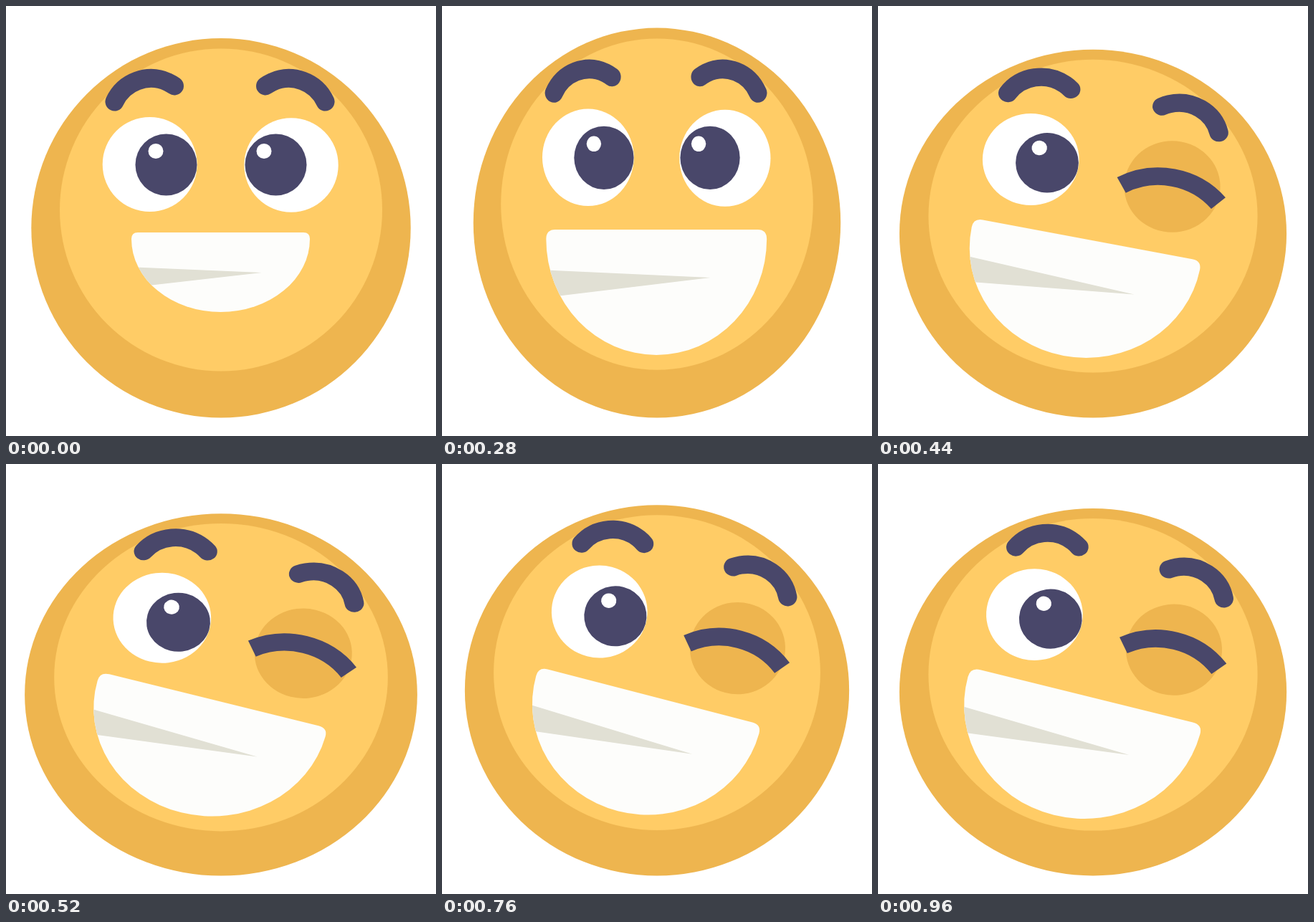
Animation of 600x600 px, one loop 1 s. Source, as an HTML page with a canvas:

```html
<!DOCTYPE html>
<html lang="en">
<head>
<meta charset="utf-8">
<title>Winking face</title>
<style>
  html, body { margin: 0; width: 100%; height: 100%; overflow: hidden; background: #fff; }
  canvas { display: block; width: 100vw; height: 100vh; }
</style>
</head>
<body>
<canvas id="stage" width="600" height="600"></canvas>
<script>
const ctx = document.getElementById('stage').getContext('2d');

const LOOP = 1000, STEP = 40, WINK_AT = 360;
const SHADE = '#eeb54f', SKIN = '#ffcc66', INK = '#49476a';
const TEETH = '#fdfdfb', GAP = '#e1e0d4', WHITE = '#fff';
const GROUND = 574.5, PIVOT = 285;

// Cubic Bezier easing, solved by bisection.
function bezier(x1, y1, x2, y2) {
  const at = (a, b, s) => 3 * (1 - s) ** 2 * s * a + 3 * (1 - s) * s * s * b + s ** 3;
  return p => {
    let lo = 0, hi = 1;
    for (let i = 0; i < 24; i++) {
      const mid = (lo + hi) / 2;
      if (at(x1, x2, mid) < p) lo = mid; else hi = mid;
    }
    return at(y1, y2, lo);
  };
}
const easeIn = bezier(.42, 0, 1, 1);
const easeOut = bezier(0, 0, .58, 1);
const easeInOut = bezier(.42, 0, .58, 1);

const lerp = (a, b, p) => a + (b - a) * p;

// Keys are [time, value, easing towards this key].
function track(t, keys) {
  for (let i = 1; i < keys.length; i++) {
    const [t0, v0] = keys[i - 1], [t1, v1, ease] = keys[i];
    if (t < t1) return t <= t0 ? v0 : lerp(v0, v1, ease((t - t0) / (t1 - t0)));
  }
  return keys[keys.length - 1][1];
}

const stretchX = [[0, 1], [280, .968, easeIn], [560, 1.037, easeOut], [760, 1.013, easeInOut], [960, 1.0205, easeInOut]];
const stretchY = [[0, 1], [280, 1.0274, easeIn], [560, .952, easeOut], [760, .977, easeInOut], [960, .968, easeInOut]];
const tilt = [[280, 0], [620, 17.1, easeOut], [820, 14.6, easeInOut]];
const smile = [[0, 0], [240, 1, easeOut]];
const grin = [[760, 0], [960, 1, easeInOut]];

function disc(x, y, r, fill) {
  ctx.beginPath();
  ctx.arc(x, y, r, 0, Math.PI * 2);
  ctx.fillStyle = fill;
  ctx.fill();
}

function strokeArc(x, y, r, from, to, width, cap) {
  ctx.beginPath();
  ctx.arc(x, y, r, from, to);
  ctx.strokeStyle = INK;
  ctx.lineWidth = width;
  ctx.lineCap = cap;
  ctx.stroke();
}

function brow(x, side) {
  const outer = Math.atan2(-23.5, -50.8), inner = Math.atan2(-45.5, 32.7);
  ctx.save();
  ctx.translate(x, 157);
  ctx.scale(side, 1);
  strokeArc(0, 0, 56, outer, inner, 26, 'round');
  ctx.restore();
}

function openEye(x, y, r, pupilX, glintX) {
  disc(x, y, r, WHITE);
  disc(pupilX, 221.5, 43, INK);
  disc(glintX, 202.5, 10.5, WHITE);
}

function closedEye(x, y, r) {
  const spread = .684, up = -Math.PI / 2;
  disc(x, y, r, SHADE);
  strokeArc(397, 316, 106.9, up - spread, up + spread, 25.4, 'butt');
}

function mouth(open, wide) {
  const half = lerp(124.5, 159, open) + 5 * wide;
  const top = lerp(316, 319, open) - 2.2 * wide;
  const bottom = lerp(427, 489.3, open) + 4.7 * wide;
  const r = lerp(9, 13, open) + wide;
  const x = lerp(299.5, 299.2, open), y = top + r;

  ctx.save();
  ctx.beginPath();
  ctx.moveTo(x - half, y);
  ctx.quadraticCurveTo(x - half, top, x - half + r, top);
  ctx.lineTo(x + half - r, top);
  ctx.quadraticCurveTo(x + half, top, x + half, y);
  ctx.ellipse(x, y, half, bottom - y, 0, 0, Math.PI);
  ctx.closePath();
  ctx.fillStyle = TEETH;
  ctx.fill();
  ctx.clip();

  const tipX = lerp(357, 377, open), tipY = lerp(372, 384.2, open), len = 260;
  ctx.beginPath();
  ctx.moveTo(tipX, tipY);
  ctx.lineTo(tipX - len, tipY - len * .043);
  ctx.lineTo(tipX - len, tipY + len * .114);
  ctx.fillStyle = GAP;
  ctx.fill();
  ctx.restore();
}

function draw(t) {
  ctx.setTransform(1, 0, 0, 1, 0, 0);
  ctx.fillStyle = WHITE;
  ctx.fillRect(0, 0, 600, 600);

  // Squash and stretch from the ground up.
  ctx.translate(300, GROUND);
  ctx.scale(track(t, stretchX), track(t, stretchY));
  ctx.translate(-300, -GROUND);
  disc(300, GROUND - 264.7, 264.7, SHADE);
  disc(300, 284.5, 225, SKIN);

  // Features tilt together around the face centre.
  ctx.translate(300, PIVOT);
  ctx.rotate(track(t, tilt) * Math.PI / 180);
  ctx.translate(-300, -PIVOT);
  brow(202.3, 1);
  brow(394.7, -1);
  openEye(200.7, 221, 66, 223.5, 209);
  if (t < WINK_AT) openEye(398, 222, 65.7, 376.5, 360);
  else closedEye(398, 222, 65.7);
  mouth(track(t, smile), track(t, grin));
}

let start;
function tick(now) {
  start ??= now;
  const t = (now - start) % LOOP;
  draw(Math.floor((t + 1) / STEP) * STEP % LOOP);
  requestAnimationFrame(tick);
}
draw(0);
requestAnimationFrame(tick);
</script>
</body>
</html>
```
